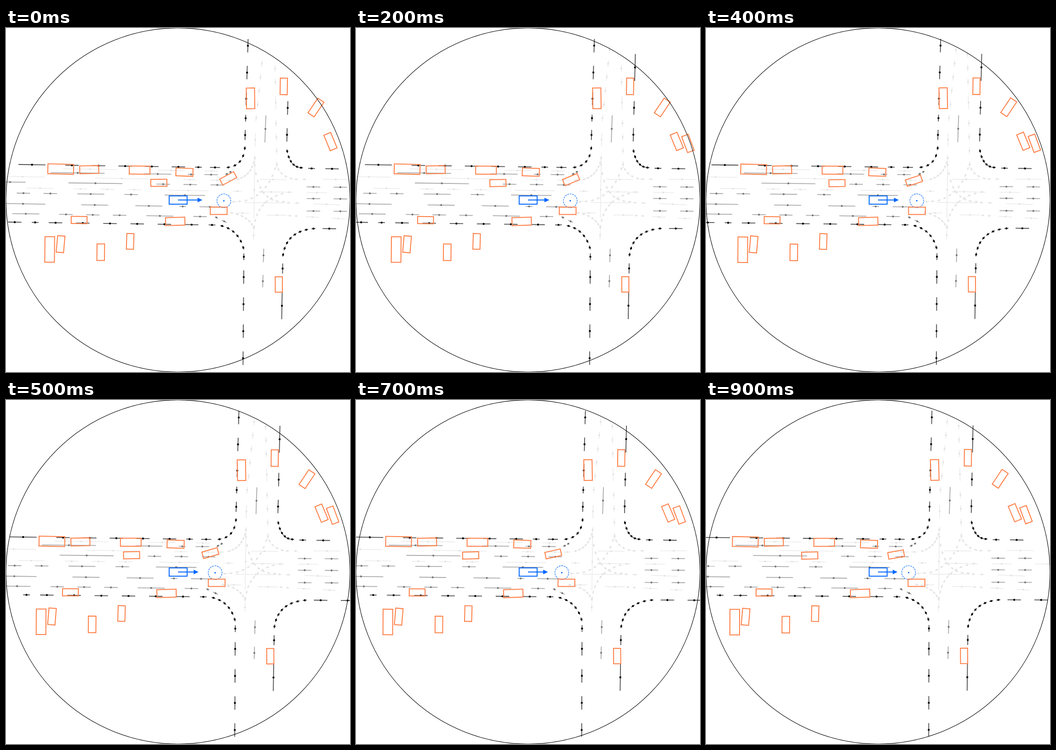
An HTML page with a canvas for the animation above (1 s loop, 748 px wide and 748 px high).

```html
<!DOCTYPE html>
<html lang="en">
<head>
<meta charset="utf-8">
<title>Intersection, ego view</title>
<style>
html, body { margin: 0; width: 100%; height: 100%; overflow: hidden; background: #fff; }
canvas { display: block; }
</style>
</head>
<body>
<canvas id="view" width="748" height="748"></canvas>
<script>
const ctx = document.getElementById('view').getContext('2d');
const C = 374, RANGE = 374, STEP = 100, STEPS = 10, DEG = Math.PI / 180;
const UNIT = 29.3; // length of one road unit; the dash covers half of it
const ORANGE = '#ff7f47', BLUE = '#0066ff';

const LANE = { dot: '#e2e2e2', line: '#ededed', r: 2 };
const DIVIDER = { dot: '#747474', line: '#aaaaaa', r: 2.1 };
const EDGE = { dot: '#000000', line: '#505050', r: 2.2 };

const marks = [];

function addMark(style, x, y, angle, units) {
  marks.push({ style, x, y, dx: Math.cos(angle) * UNIT * units / 4, dy: Math.sin(angle) * UNIT * units / 4 });
}

// Joined segments of the given unit lengths; the first and last are centred on the end points.
function road(style, [x0, y0], [x1, y1], ...units) {
  const angle = Math.atan2(y1 - y0, x1 - x0);
  const at = [0];
  for (let i = 1; i < units.length; i++) at.push(at[i - 1] + (units[i - 1] + units[i]) / 2);
  const total = at[at.length - 1] || 1;
  units.forEach((u, i) => {
    const t = at[i] / total;
    addMark(style, x0 + (x1 - x0) * t, y0 + (y1 - y0) * t, angle, u);
  });
}

// Even short segments along a quadratic curve.
function bend(style, n, [x0, y0], [cx, cy], [x1, y1]) {
  for (let i = 0; i < n; i++) {
    const t = i / (n - 1), s = 1 - t;
    const angle = Math.atan2(s * (cy - y0) + t * (y1 - cy), s * (cx - x0) + t * (x1 - cx));
    addMark(style, s * s * x0 + 2 * s * t * cx + t * t * x1, s * s * y0 + 2 * s * t * cy + t * t * y1, angle, 0.58);
  }
}

const level = (style, x, y, units) => road(style, [x, y], [x + 100, y + 1], units);

// lanes: west arm
road(LANE, [6.5, 304.5], [447, 311], 4, 8, 4, 2);
road(LANE, [36, 323.3], [459, 331], 6.6, 8, 2, 2);
road(LANE, [74, 348.5], [503, 355], 4, 2, 2, 2, 6, 1.3);
level(LANE, 514, 402.5, 2);
// lanes: north arm
road(LANE, [559.5, 48], [544, 196], 1, 1, 1, 1, 1, 1);
road(LANE, [542, 243], [541, 283], 2, 0.8);
road(LANE, [584.5, 58], [589, 297], 1, 1, 1, 2, 1, 1, 1, 1);
road(LANE, [540, 352], [538.5, 451], 8.5, 1.3);
// lanes: east arm
road(LANE, [631, 329], [717, 329.3], 0.6, 0.6, 4);
road(LANE, [615, 357.3], [778, 359], 1.2, 3, 4);
road(LANE, [614, 380], [697, 383.5], 0.6, 0.8, 4);
road(LANE, [617, 408], [722.5, 414.3], 0.5, 0.5, 2, 2);
level(LANE, 581, 329.5, 4);
level(LANE, 577, 356.5, 3.7);
level(LANE, 562, 380, 6);
level(LANE, 589, 407, 3);
// lanes: turns
bend(LANE, 8, [541, 283], [534.5, 320], [504, 329]);
level(LANE, 486, 331, 1);
bend(LANE, 5, [588.5, 297], [594, 320], [620, 327.5]);
bend(LANE, 9, [541, 298], [548, 378], [603, 378]);
road(LANE, [495, 378], [508, 377], 1, 0.6);
bend(LANE, 8, [522, 375], [567.5, 361.5], [585, 306]);
bend(LANE, 10, [615, 357], [547, 368.5], [539.5, 432]);
bend(LANE, 7, [491, 402], [529, 409.5], [538.5, 435]);

// dividers
road(DIVIDER, [156, 315.2], [446, 318.9], 8, 4, 1, 2);
road(DIVIDER, [480, 317.5], [488, 313], 0.5, 0.4);
road(DIVIDER, [9, 335], [459.5, 341.3], 4.6, 8, 2, 2, 2);
road(DIVIDER, [38, 359.2], [389, 363.6], 2, 2, 4, 2, 6);
road(DIVIDER, [37, 382.3], [443, 389], 6.6, 4, 4, 1, 3);
road(DIVIDER, [43, 404], [422, 410], 4, 2, 2, 2, 4, 2);
road(DIVIDER, [457.5, 412], [474.5, 420.5], 0.5, 0.8);
for (const y of [345.6, 371, 398]) road(DIVIDER, [668.5, y], [727, y + 0.6], 2, 2);
road(DIVIDER, [564, 219.5], [563, 247.5], 4);
road(DIVIDER, [560, 494.5], [558.5, 550.5], 2, 1.85);

// road edges, corner by corner
road(EDGE, [56.5, 297.2], [454.5, 303.2], 4, 2, 2, 2, 2, 2, 1, 1.5);
bend(EDGE, 5, [483.5, 303], [515.5, 298.5], [519.3, 261.5]);
road(EDGE, [520, 232.7], [526, 38.5], 1.5, 1, 1.9, 2, 2);

road(EDGE, [614.8, 86], [611, 232.3], 4, 2, 2);
bend(EDGE, 6, [611.5, 268], [618, 302], [641.5, 303.7]);
road(EDGE, [664.5, 305.4], [709, 306.2], 1, 2);

road(EDGE, [761.5, 437], [703, 436.3], 2, 2);
bend(EDGE, 8, [668.5, 436.3], [610.5, 441.3], [602.5, 493]);
road(EDGE, [601.5, 523], [600, 604], 1.5, 4);

road(EDGE, [19, 422.2], [448, 428.2], 2, 1, 2, 2, 2, 2, 2, 2, 1);
bend(EDGE, 6, [470, 430.5], [505, 440], [516, 477.5]);
road(EDGE, [517.2, 497.5], [515.5, 718], 1, 2, 2, 2, 2);

// x, y, width, height, angle
const parked = [
  [119, 306.7, 56, 21.5, 1.4],
  [181, 308, 41.3, 17, -1],
  [290.5, 309, 45, 17.5, 0.4],
  [388, 313.4, 37, 17, 2.2],
  [159, 417.5, 34.5, 15.5, 0.8],
  [368, 420.5, 42, 17.3, -1.7],
  [95, 481.5, 21, 55.5, 0.5],
  [118.7, 470, 16, 36, 5],
  [206, 487.5, 16.5, 36, 0.7],
  [270, 464, 15.5, 34, 1.8],
  [593.2, 557.7, 15.5, 33.5, -0.2],
  [531.7, 153, 18, 45, -0.8],
  [604, 127, 15.5, 36, 1],
  [674, 173, 16, 38.5, 34],
  [705.5, 247, 16, 36.5, -22.5],
  [729.6, 251.4, 15.2, 37, -20.3]
];

// Cars under way, placed in the ego view at step k.
const moving = [
  k => [332.3 - 11.85 * k, 336.7 + 0.17 * k, 35, 15.2, -0.8 - 0.08 * k],
  k => [483.2 - 7.76 * k, 327 + 1.45 * k - 0.05 * k * k, 34.5, 14.5, -28 + 2.9 * k - 0.1 * k * k],
  k => [462.5 - 1.3 * k + 0.085 * k * k, 397.5, 36.5, 16, 0.2]
];

function dot(x, y, r, color) {
  ctx.fillStyle = color;
  ctx.beginPath();
  ctx.arc(x, y, r, 0, 7);
  ctx.fill();
}

function box([x, y, w, h, deg], color) {
  ctx.save();
  ctx.translate(x, y);
  ctx.rotate(deg * DEG);
  ctx.strokeStyle = color;
  ctx.lineWidth = 2;
  ctx.strokeRect(-w / 2, -h / 2, w, h);
  ctx.restore();
}

function drawMark({ style, x, y, dx, dy }) {
  ctx.strokeStyle = style.line;
  ctx.lineWidth = 1.8;
  ctx.beginPath();
  ctx.moveTo(x - dx, y - dy);
  ctx.lineTo(x + dx, y + dy);
  ctx.stroke();
  dot(x, y, style.r, style.dot);
}

function ego(k) {
  box([C + 0.3, C + 0.1, 39, 18, 0], BLUE);
  const tip = k ? 421.3 - 0.55 * k : 427;
  ctx.strokeStyle = ctx.fillStyle = BLUE;
  ctx.lineWidth = 1.8;
  ctx.beginPath();
  ctx.moveTo(C, C);
  ctx.lineTo(tip - 9, C);
  ctx.stroke();
  ctx.beginPath();
  ctx.moveTo(tip, C);
  ctx.lineTo(tip - 10.5, C - 5);
  ctx.lineTo(tip - 10.5, C + 5);
  ctx.fill();
}

function goal(x, y) {
  dot(x, y, 1.6, BLUE);
  ctx.strokeStyle = BLUE;
  ctx.lineWidth = 1.1;
  ctx.setLineDash([3.85, 1.67]);
  ctx.beginPath();
  ctx.arc(x, y, 15, Math.PI / 2, -1.5 * Math.PI, true);
  ctx.stroke();
  ctx.setLineDash([]);
}

function draw(k) {
  const shift = 3.95 * k - 0.03 * k * k;
  const turn = 0.00045 * k + 0.00002 * k * k;
  const cos = Math.cos(turn), sin = Math.sin(turn);
  const inRange = (x, y) => {
    const dx = x - C, dy = y - C;
    return Math.hypot(cos * dx + sin * dy - shift, cos * dy - sin * dx) < RANGE;
  };

  ctx.fillStyle = '#fff';
  ctx.fillRect(0, 0, 748, 748);

  ctx.save();
  ctx.translate(C - shift, C);
  ctx.rotate(-turn);
  ctx.translate(-C, -C);
  for (const m of marks) if (inRange(m.x, m.y)) drawMark(m);
  for (const car of parked) if (inRange(car[0], car[1])) box(car, ORANGE);
  goal(473.7, 375.8);
  ctx.restore();

  for (const car of moving) box(car(k), ORANGE);
  ego(k);

  ctx.strokeStyle = '#000';
  ctx.lineWidth = 1.1;
  ctx.beginPath();
  ctx.arc(C, C, RANGE, 0, 2 * Math.PI);
  ctx.stroke();
}

const start = performance.now();
function tick() {
  draw(Math.floor((performance.now() - start) / STEP) % STEPS);
  requestAnimationFrame(tick);
}
tick();
</script>
</body>
</html>
```
